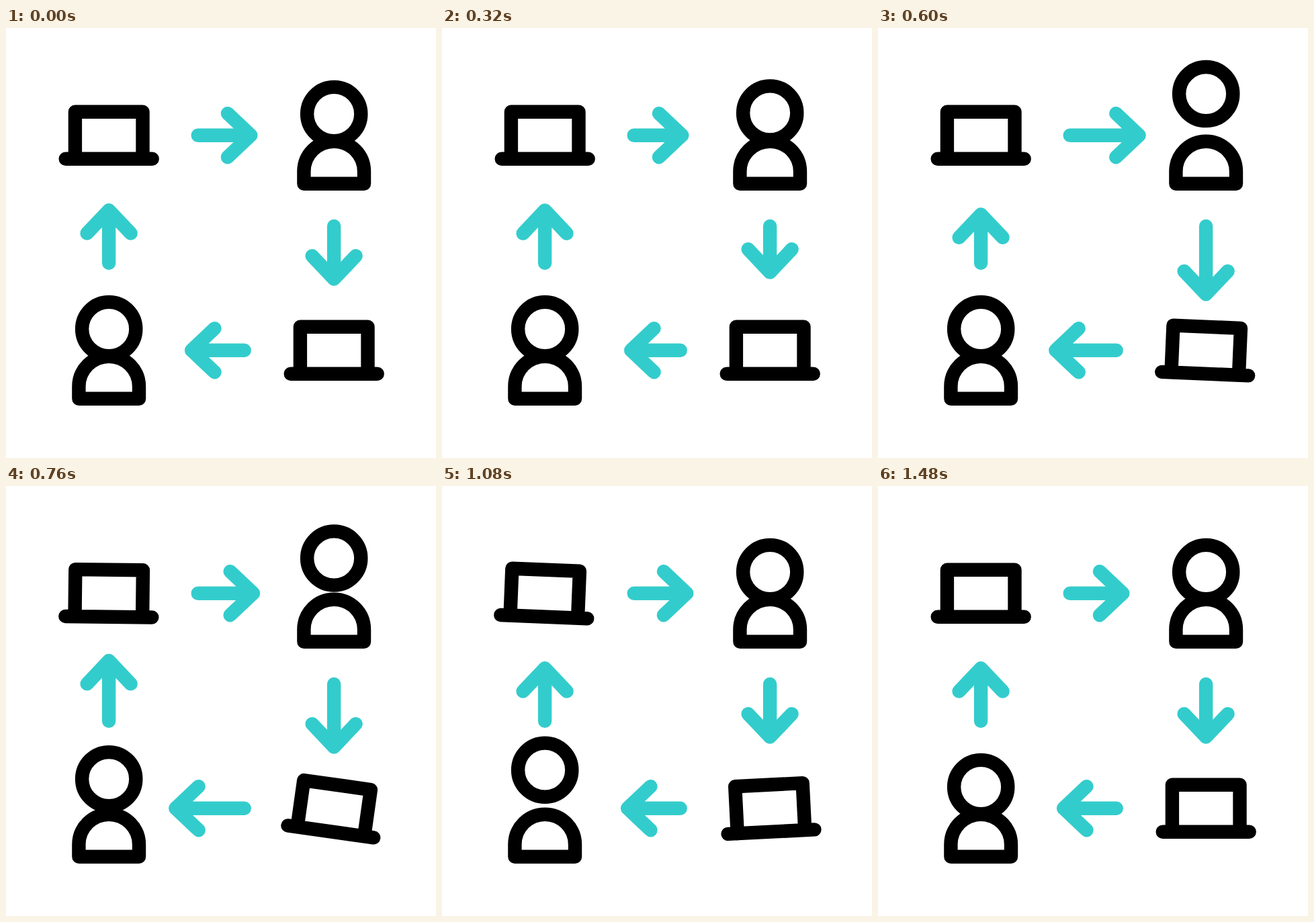
Recreate the animation shown at these times as an HTML page. Size 640 by 640 pixels, loop 1640 ms.

```html
<!DOCTYPE html>
<html lang="en">
<head>
<meta charset="utf-8">
<title>Exchange cycle</title>
<style>
  html, body { margin: 0; width: 100%; height: 100%; overflow: hidden; background: #fff; }
  svg { display: block; width: 100%; height: 100%; }
  svg g { fill: none; stroke-width: 20.4; stroke-linecap: round; stroke-linejoin: round; }
  .icon { stroke: #000; }
  .arrow { stroke: #3cc; }
</style>
</head>
<body>
<svg viewBox="0 0 640 640"></svg>
<script>
const LOOP = 1640;
const svg = document.querySelector('svg');

function add(parent, tag, attrs) {
  const node = document.createElementNS('http://www.w3.org/2000/svg', tag);
  for (const name in attrs) node.setAttribute(name, attrs[name]);
  return parent.appendChild(node);
}

// Eased value at time t through [time, value] keys, held outside them.
function track(keys, t) {
  if (t <= keys[0][0]) return keys[0][1];
  for (let i = 1; i < keys.length; i++) {
    const [t0, a] = keys[i - 1], [t1, b] = keys[i];
    if (t < t1) {
      const p = (t - t0) / (t1 - t0);
      return a + (b - a) * p * p * (3 - 2 * p);
    }
  }
  return keys[keys.length - 1][1];
}

// Each part returns a function that poses it at time t.
function laptop(x, y, delay) {
  const group = add(svg, 'g', { class: 'icon' });
  add(group, 'path', { d: 'M-50.3 35V-35H50.3V35M-64.5 35H64.5' });
  const tilt = [[524, 0], [734, 8], [770, 8], [990, -3.2], [1035, -3.2], [1285, 0]];
  return t => group.setAttribute('transform',
    `translate(${x} ${y}) rotate(${track(tilt, t - delay)})`);
}

function person(x, y, lift) {
  const group = add(svg, 'g', { class: 'icon', transform: `translate(${x} ${y})` });
  add(group, 'path', { d: 'M-44.8 103.7V85.5a44.8 44.8 0 0 1 89.6 0V103.7Z' });
  const head = add(group, 'circle', { r: 40.1 });
  return t => head.setAttribute('cy', -track(lift, t));
}

function arrow(x, y, angle, delay, dip, peak) {
  const group = add(svg, 'g', { class: 'arrow', transform: `translate(${x} ${y}) rotate(${angle})` });
  const line = add(group, 'path', {});
  const stretch = [[70, 0], [250, -dip], [268, -dip], [562, peak], [577, peak], [820, 0]];
  return t => {
    const tip = 78.6 + track(stretch, t - delay);
    line.setAttribute('d', `M0 0H${tip}m-34.4 -32.5l34.4 32.5l-34.4 32.5`);
  };
}

const parts = [
  laptop(153.2, 159.7, 200),
  laptop(488.2, 479.7, 0),
  person(488.2, 128, [[275, 0], [610, 30], [637, 30], [967, 0]]),
  person(153.2, 448, [[630, 0], [940, 30.7], [990, 30.7], [1330, 0]]),
  arrow(285.7, 159.7, 0, 0, 10, 25),
  arrow(488.1, 295, 90, 80, 10, 24.5),
  arrow(354.7, 479.7, 180, 160, 10, 24.5),
  arrow(153.1, 349.8, 270, 240, 12, 12.5)
];

function draw() {
  const t = performance.now() % LOOP;
  parts.forEach(pose => pose(t));
  requestAnimationFrame(draw);
}
draw();
</script>
</body>
</html>
```
